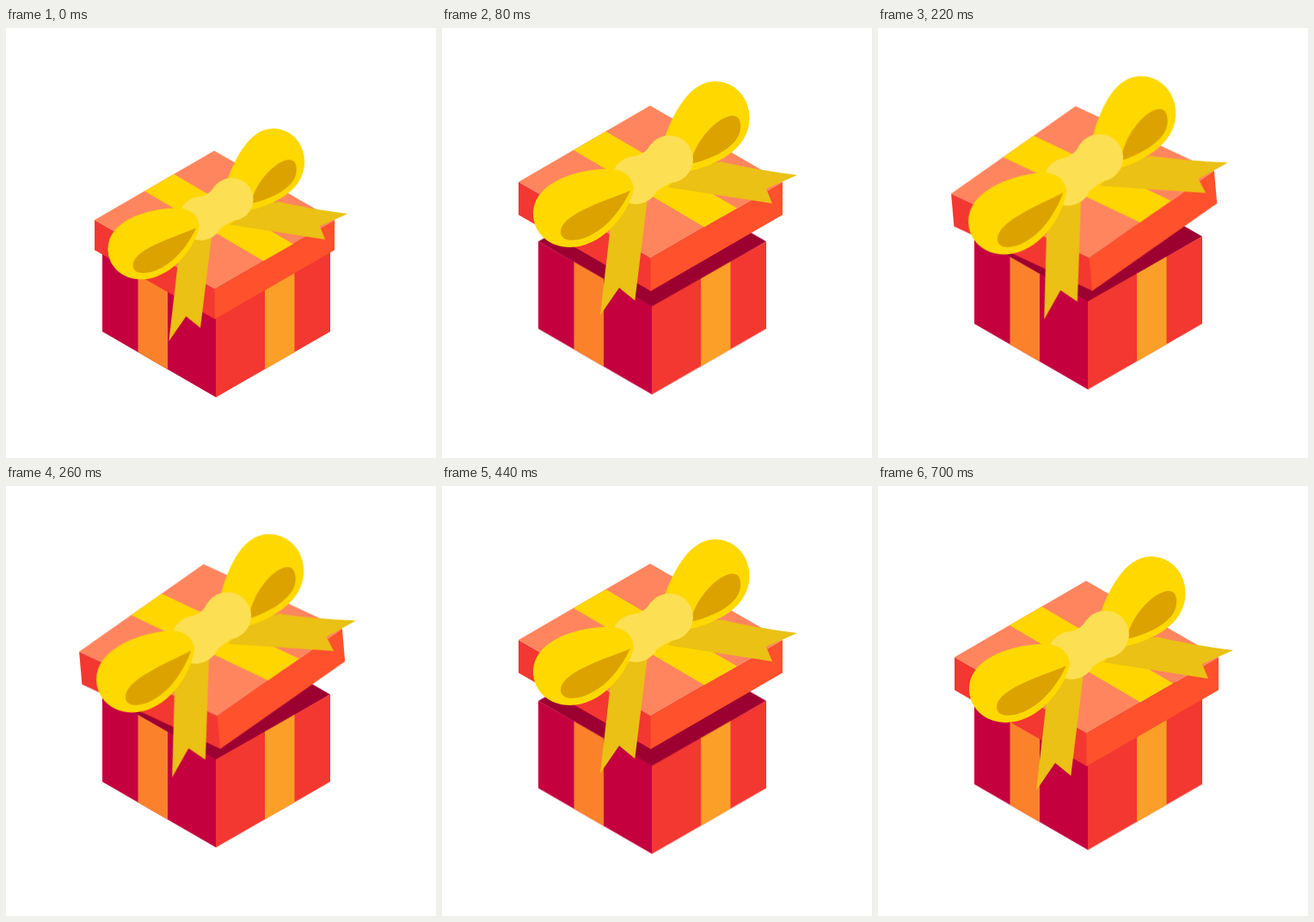
An HTML page that plays this animation: 500x500 px, repeating every 1200 ms.

```html
<!DOCTYPE html>
<html lang="en">
<head>
<meta charset="utf-8">
<title>Gift box</title>
<style>
  html, body { margin: 0; height: 100%; overflow: hidden; background: #fff; }
  svg { display: block; width: 100vw; height: 100vh; }

  #box { animation: bob 1200ms infinite; }
  #lid { transform-origin: 243px 251px; animation: lid 1200ms steps(4) infinite; }

  /* The motion advances in 20 ms ticks, hence one step per tick. */
  @keyframes bob {
    0%           { transform: translateY(0); animation-timing-function: steps(12); }
    19.99%       { transform: translateY(-10px); animation-timing-function: steps(12); }
    39.99%       { transform: translateY(0); animation-timing-function: steps(11); }
    58.33%, 100% { transform: translateY(-6.3px); }
  }
  /* Lift, shake in 80 ms swings, drop. */
  @keyframes lid {
    0%             { transform: translateY(19.5px) rotate(0deg) scale(.909); }
    6.66%          { transform: translateY(-20px) rotate(0deg) scale(1); }
    13.33%, 26.66% { transform: translateY(-20px) rotate(10deg) scale(1); }
    19.99%         { transform: translateY(-20px) rotate(-10deg) scale(1); }
    33.33%, 36.66% { transform: translateY(-20px) rotate(0deg) scale(1); }
    43.33%, 100%   { transform: translateY(0) rotate(0deg) scale(1); }
  }
</style>
</head>
<body>
<svg viewBox="0 0 500 500">
  <g id="box">
    <path fill="#9c0031" d="M112 251.5L244.5 175L377 251.5L244.5 328Z"/>
    <path fill="#c4003f" d="M112 251.5L244.3 327V429.4L112 353Z"/>
    <path fill="#f33731" d="M377 251.5L244 327V429.4L377 353Z"/>
    <path fill="#fb822b" d="M153.5 275.2L188 294.9V396.9L153.5 377Z"/>
    <path fill="#fb9f28" d="M301 294.7L335.5 275.1V377L301 396.7Z"/>
  </g>

  <g id="lid">
    <path fill="#f33731" d="M89 199L243 287.5V326L89 237.3Z"/>
    <path fill="#ff512b" d="M242.5 287.5L396 199V237.3L242.5 326Z"/>
    <path fill="#ff855e" d="M242 110.3L396 199L242.5 287.5L89 199Z"/>
    <path fill="#ffd600" d="M190.5 140.2L343 229.6L305 251.5L153 162Z"/>

    <g fill="#eac114">
      <path d="M262 205L292 180L325 175.5Q360 184 413 191L377 207L384 224Z"/>
      <path d="M200 215L239 218L224.3 337L206 322L184 354Z"/>
    </g>
    <path fill="#ffd800" d="M258 150C268 120 288 82 317 82C340 82 357.5 100 357.5 125C357.5 160 320 180 285 187Z"/>
    <path fill="#dca300" d="M289 178C294 150 322 122 338 122C348 122 349 135 345 145C336 163 310 173 289 178Z"/>

    <g fill="#fcdf52">
      <circle cx="264.5" cy="172.5" r="27.5"/>
      <circle cx="225" cy="197" r="28"/>
      <path d="M220 170Q236 168 243 155L284 192Q258 203 250 210Z"/>
    </g>

    <path fill="#ffd800" d="M200 184C165 182 106 197 106 236C106 258 124 275 149 275C183 275 216 240 223 207Q221 188 200 184Z"/>
    <path fill="#dca300" d="M219 209C185 223 137 237 138 258C139 268 152 268 163 265C190 256 208 232 219 209Z"/>
  </g>
</svg>
</body>
</html>
```
